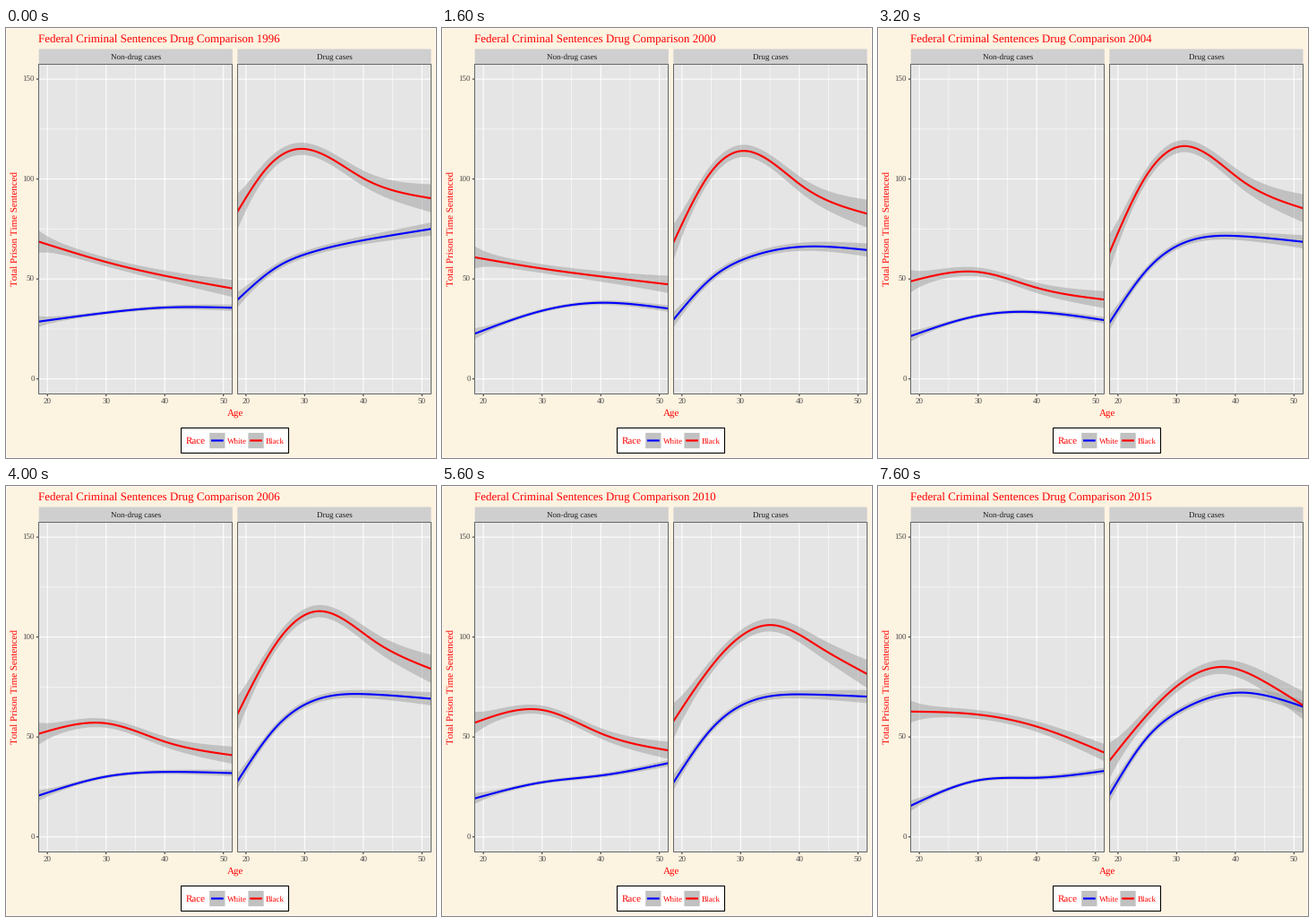
Animation, 480 px wide and 480 px high, one loop 8 s. Source, as a matplotlib script:

```python
import math

import matplotlib.pyplot as plt
import numpy as np
from matplotlib.animation import FuncAnimation
from matplotlib.patches import Polygon, Rectangle

plt.rcParams.update({
    "font.family": "Liberation Serif",
    "text.hinting": "none",
    "text.hinting_factor": 1,
})

SIZE, DPI = 480, 72
PAPER, PANEL, STRIP = "#fdf3e1", "#e5e5e5", "#cfcfcf"
BAND, BAND_ALPHA, KEY = "#999999", 0.47, "#c1c1c1"
INK, BORDER, TICK = "#333333", "#666666", "#4d4d4d"

TOP, BOTTOM, WIDTH = 40.4, 408.3, 216.15
LEFT, RIGHT = 36.7, 258.35
FIRST_AGE, AGE_PX = 18.55, 6.55
ZERO_Y, MONTH_PX = 391.7, 2.231

YOUNG, OLD = 18.6, 51.5
AGES = np.linspace(YOUNG - 0.2, OLD + 0.2, 120)
KEY_YEARS = [1996, 2000, 2004, 2010, 2013, 2015]


def natural_spline(knots, values, at):
    """Natural cubic spline through the knots, linear outside them."""
    x = (np.array(knots) - 35) / 10
    t = (at - 35) / 10
    n = len(x)
    system = np.zeros((n + 2, n + 2))
    system[:n, :n] = np.abs(x[:, None] - x) ** 3
    system[:n, n:] = np.column_stack([np.ones(n), x])
    system[n:, :n] = system[:n, n:].T
    c = np.linalg.solve(system, np.append(values, [0, 0]))
    return np.abs(t[:, None] - x) ** 3 @ c[:n] + c[n] + c[n + 1] * t


def gentle(start, thirty, forty, end):
    """Slow drift through the ages of 30 and 40."""
    return [YOUNG, 30, 40, OLD], [start, thirty, forty, end]


def shoulder(start, bend, level, end):
    """Steep rise that bends into a plateau."""
    rise = start + 0.67 * (bend - start)
    return [YOUNG, 25, 31, 41, OLD], [start, rise, bend, level, end]


def hump(start, top_age, top, end):
    """Rise to a peak and fall; a later peak falls off more slowly at first."""
    rise = start + 0.71 * (top - start)
    fall = top - (0.6 - 0.024 * (top_age - 29)) * (top - end)
    ages = [YOUNG, (YOUNG + top_age) / 2, top_age, (top_age + OLD) / 2, OLD]
    return ages, [start, rise, top, fall, end]


def error(young, middle, old):
    """Half width of the band: narrow in the middle, wide at both ends."""
    near = np.exp((YOUNG - AGES) / 2.5)
    far = (np.maximum(AGES - 30, 0) / (OLD - 30)) ** 2
    return middle + (young - middle) * near + (old - middle) * far


def x_px(left, age):
    return left + (age - FIRST_AGE) * AGE_PX


def y_px(months):
    return ZERO_Y - months * MONTH_PX


def crisp(v):
    return math.floor(v) + 0.5


fig = plt.figure(figsize=(SIZE / DPI, SIZE / DPI), dpi=DPI, facecolor=PAPER)
ax = fig.add_axes([0, 0, 1, 1])
ax.set(xlim=(0, SIZE), ylim=(SIZE, 0))
ax.axis("off")


def box(x0, y0, x1, y1, z=1, **style):
    patch = Rectangle((x0, y0), x1 - x0, y1 - y0, zorder=z, snap=False, **style)
    return ax.add_patch(patch)


def stroke(xs, ys, color, width, z=2):
    return ax.plot(xs, ys, color=color, lw=width, zorder=z, snap=False,
                   solid_capstyle="butt")[0]


def label(x, y, text, size, color, ha="center", **style):
    return ax.text(x, y, text, size=size, color=color, ha=ha,
                   va="baseline", zorder=8, **style)


def draw_panel(left, name):
    right = left + WIDTH
    box(left, TOP - 16.9, right, TOP, fc=STRIP, ec="none")
    label((left + right) / 2, 35.2, name, 8.8, "#1a1a1a")
    clip = box(left, TOP, right, BOTTOM, fc=PANEL, ec="none")
    for age in range(20, 51, 5):
        x = x_px(left, age)
        stroke([x, x], [TOP, BOTTOM], "white", 0.53 if age % 10 else 1.07)
        if age % 10 == 0:
            stroke([x, x], [BOTTOM, BOTTOM + 2.75], INK, 1.07)
            label(x, 419.8, str(age), 8.8, TICK)
    for months in range(0, 151, 25):
        y = y_px(months)
        stroke([left, right], [y, y], "white", 0.53 if months % 50 else 1.07)
    box(crisp(left), crisp(TOP), crisp(right), crisp(BOTTOM), z=7,
        fc="none", ec=BORDER, lw=1)
    return clip


def draw_legend():
    box(195.5, 446.5, 315.5, 474.5, fc="white", ec="black", lw=1.07)
    label(200.7, 464, "Race", 11, "red", ha="left")
    for x, name, color in ((227.2, "White", "blue"), (270.4, "Black", "red")):
        box(x, 451.9, x + 17.28, 469.2, fc=KEY, ec="none")
        stroke([x + 1.73, x + 15.55], [460.5, 460.5], color, 2.13, z=3)
        label(x + 19.3, 463.6, name, 8.8, "red", ha="left")


class Smooth:
    """A fitted line with its error band; each track follows one landmark."""

    def __init__(self, left, clip, color, shape, half, *tracks):
        self.shape, self.half, self.tracks = shape, half, tracks
        self.x = x_px(left, AGES)
        self.band = ax.add_patch(Polygon([(0, 0)] * 3, fc=BAND, ec="none",
                                         alpha=BAND_ALPHA, zorder=3))
        self.line = stroke([], [], color, 2.13, z=4)
        self.band.set_clip_path(clip)
        self.line.set_clip_path(clip)

    def show(self, year):
        marks = [np.interp(year, KEY_YEARS, track) for track in self.tracks]
        mid = natural_spline(*self.shape(*marks), AGES)
        self.line.set_data(self.x, y_px(mid))
        ys = np.append(y_px(mid + self.half), y_px(mid - self.half)[::-1])
        self.band.set_xy(np.column_stack([np.append(self.x, self.x[::-1]), ys]))


box(0, 0, SIZE, SIZE, fc="none", ec="white", lw=1.07)
other = draw_panel(LEFT, "Non-drug cases")
drug = draw_panel(RIGHT, "Drug cases")
for tick in range(0, 151, 50):
    stroke([LEFT - 2.75, LEFT], [y_px(tick)] * 2, INK, 1.07)
    label(31.7, y_px(tick) + 3, str(tick), 8.8, TICK, ha="right")
title = label(36.3, 15, "", 13.2, "red", ha="left")
label(255.6, 432.8, "Age", 11, "red")
label(13, (TOP + BOTTOM) / 2, "Total Prison Time Sentenced", 11, "red",
      rotation=90, rotation_mode="anchor")
draw_legend()

smooths = [
    Smooth(LEFT, other, "blue", gentle, error(2.7, 0.9, 1.6),
           (28.7, 22.7, 21.5, 19.3, 18.1, 15.7),
           (33.1, 34.1, 31.6, 27.3, 29.7, 28.3),
           (35.7, 38.1, 33.4, 30.7, 30.0, 29.6),
           (35.6, 35.2, 29.4, 36.9, 37.3, 33.0)),
    Smooth(LEFT, other, "red", gentle, error(5.5, 2.2, 4.3),
           (68.6, 60.8, 48.9, 57.2, 69.5, 62.7),
           (58.5, 55.2, 53.5, 63.5, 64.4, 61.2),
           (51.6, 51.3, 45.6, 51.8, 56.5, 55.2),
           (45.3, 47.3, 39.7, 43.3, 42.2, 42.2)),
    Smooth(RIGHT, drug, "blue", shoulder, error(3.9, 1.7, 3.3),
           (39.7, 29.8, 28.3, 27.4, 31.6, 21.3),
           (63.2, 60.4, 67.8, 67.0, 67.4, 63.8),
           (69.9, 66.2, 71.4, 71.3, 73.7, 72.2),
           (75.0, 64.5, 68.6, 70.2, 70.0, 65.2)),
    Smooth(RIGHT, drug, "red", hump, error(9.0, 3.0, 7.0),
           (83.9, 68.6, 63.5, 58.1, 46.6, 38.3),
           (28.8, 30.0, 30.8, 35.3, 39.0, 38.3),
           (115.0, 114.0, 116.4, 106.0, 98.0, 85.0),
           (90.4, 82.7, 85.4, 81.6, 70.4, 65.9)),
]


def update(i):
    year = KEY_YEARS[0] + i
    title.set_text(f"Federal Criminal Sentences Drug Comparison {year}")
    for smooth in smooths:
        smooth.show(year)
    return [title]


anim = FuncAnimation(fig, update, frames=20, interval=400, repeat=True,
                     repeat_delay=0, blit=False)
plt.show()
```
